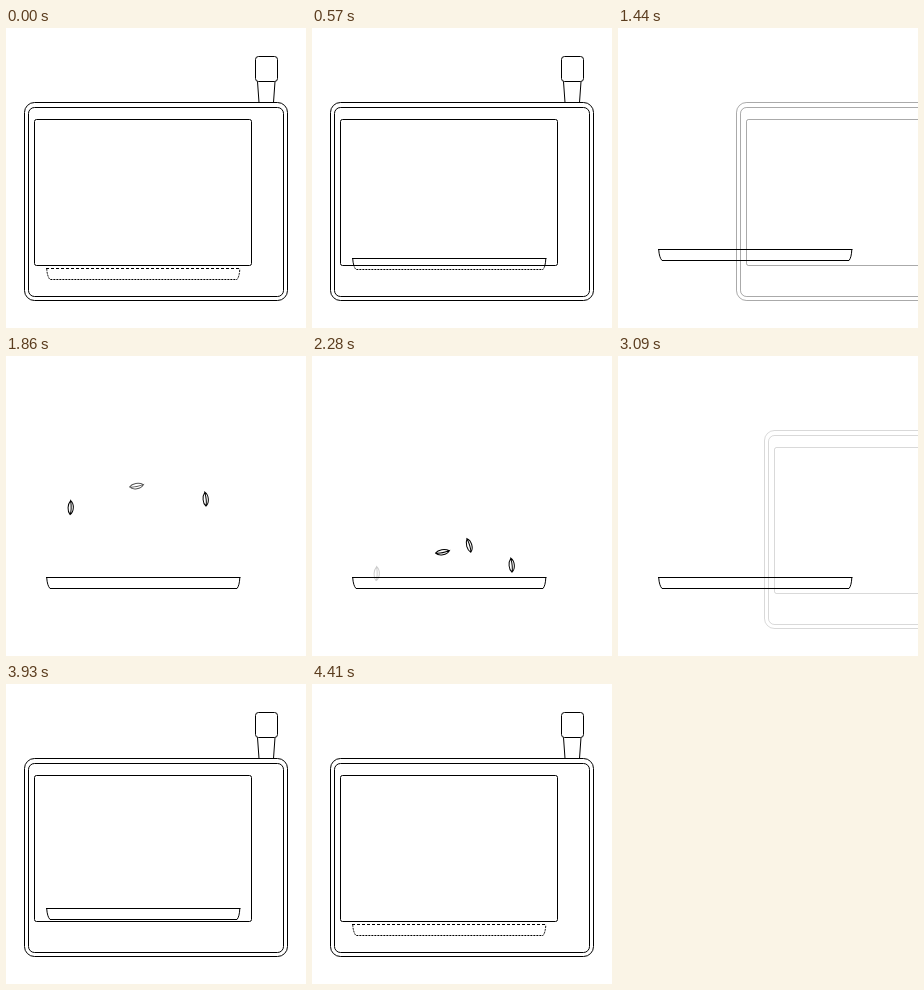
These frames come from a looping animation (300 px wide and 300 px high, 4710 ms). An HTML page with a canvas:

```html
<!DOCTYPE html>
<html lang="en">
<head>
<meta charset="utf-8">
<title>Drawer</title>
<style>
html, body { margin: 0; width: 100%; height: 100%; overflow: hidden; background: #fff; }
canvas { display: block; width: 300px; height: 300px; }
</style>
</head>
<body>
<canvas id="stage" width="300" height="300"></canvas>
<script>
const ctx = document.getElementById('stage').getContext('2d');
const LOOP = 4710, STEP = 30;
const SLIDE = 27;          // steps the case takes to leave or return
const TRAY_RISE = 19;      // pixels, one per step
const FALL = 4.72;         // pixels per step
const SCREEN_BOTTOM = 238;

// x, y at the start, tilt in degrees, start and end in ms
const seeds = [
  { x: 64.8, y: 128, tilt: 4, from: 1710, to: 2298 },
  { x: 199.8, y: 129, tilt: -3, from: 1770, to: 2370 },
  { x: 130.5, y: 125.5, tilt: 82, from: 1830, to: 2490 },
  { x: 157.3, y: 128, tilt: -14, from: 1890, to: 2520 }
];

const clamp = (v, lo, hi) => Math.min(hi, Math.max(lo, v));

function box(x0, y0, x1, y1, r) {
  ctx.beginPath();
  ctx.roundRect(x0, y0, x1 - x0, y1 - y0, r);
  ctx.stroke();
}

function drawCase(step) {
  if (step >= SLIDE) return;
  ctx.save();
  ctx.globalAlpha = 1 - step / SLIDE;
  ctx.translate(Math.round(step * 150 / SLIDE), 0);
  box(18.5, 74.5, 281.5, 272.5, 10);
  box(22.5, 79.5, 277.5, 268.5, 6);
  box(28.5, 91.5, 245.5, 237.5, 2);
  box(249.5, 28.5, 271.5, 53.5, 3);
  ctx.beginPath();
  ctx.moveTo(251.5, 53.5);
  ctx.lineTo(253, 74.5);
  ctx.moveTo(269, 53.5);
  ctx.lineTo(267.5, 74.5);
  ctx.stroke();
  ctx.restore();
}

function trayLines(y, hidden) {
  ctx.save();
  ctx.beginPath();
  if (hidden) ctx.rect(0, SCREEN_BOTTOM, 300, 300 - SCREEN_BOTTOM);
  else ctx.rect(0, 0, 300, SCREEN_BOTTOM);
  ctx.clip();
  ctx.translate(0, y + 0.5);

  if (hidden) ctx.setLineDash([3, 2]);
  ctx.beginPath();
  ctx.moveTo(40, 0);
  ctx.lineTo(234.5, 0);
  ctx.stroke();

  if (hidden) ctx.setLineDash([2, 1]);
  ctx.beginPath();
  ctx.moveTo(40.7, 0);
  ctx.quadraticCurveTo(41.2, 8, 44, 11);
  ctx.lineTo(231, 11);
  ctx.quadraticCurveTo(233.5, 8, 233.8, 0);
  ctx.stroke();
  ctx.restore();
}

function drawTray(rise) {
  const y = 240 - rise;
  trayLines(y, false);
  trayLines(y, true);
}

function drawSeed(s, t) {
  if (t < s.from || t >= s.to) return;
  ctx.save();
  ctx.globalAlpha = clamp(Math.min(t - s.from + STEP, s.to - t) / 90, 0, 1);
  ctx.translate(s.x, s.y + (t - s.from) / STEP * FALL);
  ctx.rotate(s.tilt * Math.PI / 180);
  ctx.beginPath();
  ctx.moveTo(-0.6, -7);
  ctx.bezierCurveTo(-3.6, -3, -3.4, 4, -0.2, 7);
  ctx.bezierCurveTo(3.6, 4, 3.4, -4, -0.6, -7);
  ctx.bezierCurveTo(0.2, -3, 1, 3, -0.2, 7);
  ctx.stroke();
  ctx.restore();
}

function draw(now) {
  const t = Math.floor((now % LOOP) / STEP) * STEP;
  const steps = from => (t - from) / STEP;

  const away = t < 2400 ? steps(900) : -steps(3780);
  const rise = t < 2400 ? steps(270) : TRAY_RISE - steps(3840);

  ctx.fillStyle = '#fff';
  ctx.fillRect(0, 0, 300, 300);
  ctx.strokeStyle = '#000';
  ctx.lineWidth = 1;
  drawCase(clamp(away, 0, SLIDE));
  drawTray(clamp(rise, 0, TRAY_RISE));
  seeds.forEach(s => drawSeed(s, t));
}

function tick(now) {
  draw(now);
  requestAnimationFrame(tick);
}
draw(0);
requestAnimationFrame(tick);
</script>
</body>
</html>
```
